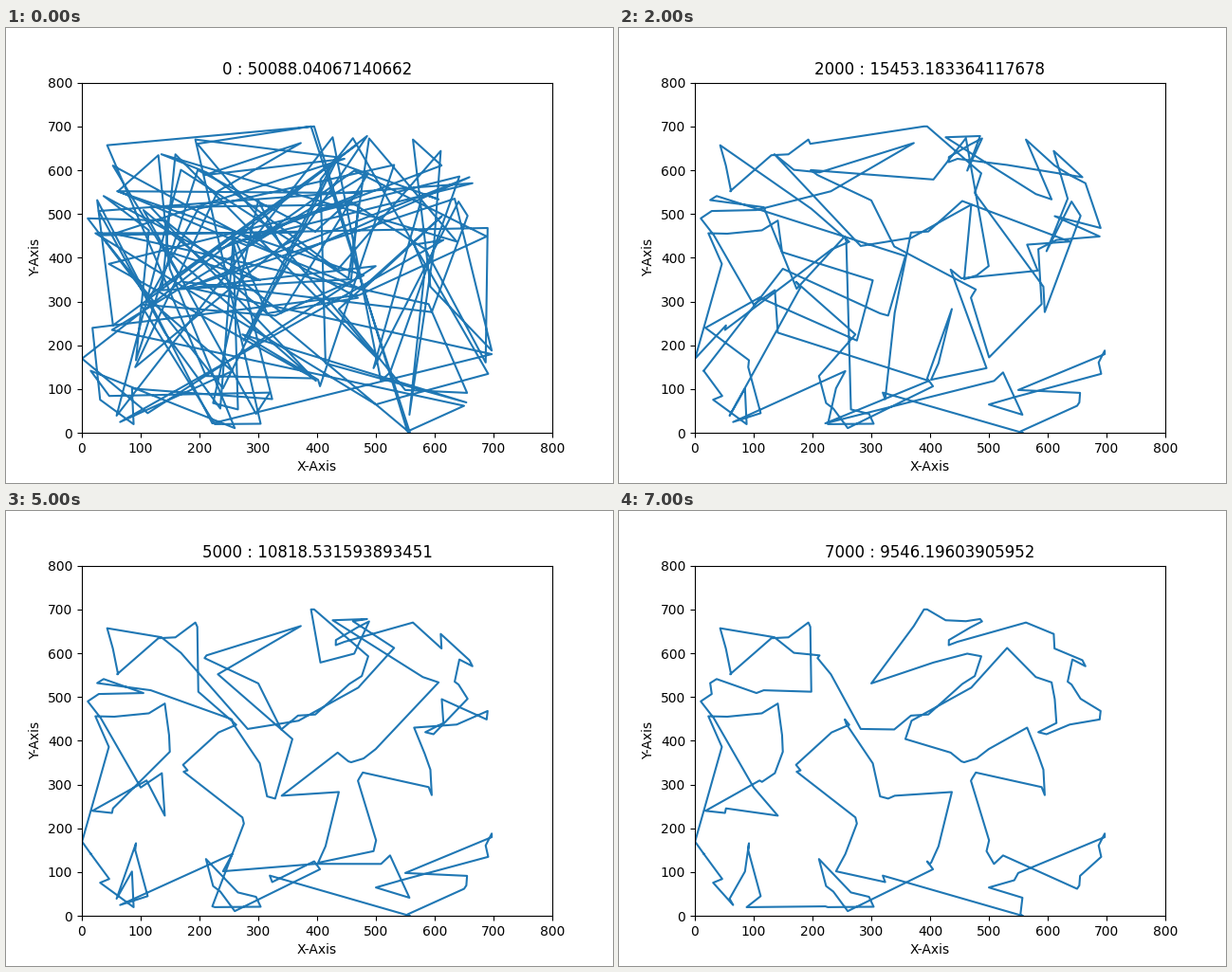
These frames come from a looping animation (640 px wide and 480 px high, 8000 ms). A matplotlib script:

```python
import random

import numpy as np
import matplotlib.pyplot as plt
from matplotlib.animation import FuncAnimation

LENGTHS = [50088.04067140662, 21998.50401487357, 15453.183364117678,
           12662.564032588038, 11598.27184635092, 10818.531593893451,
           10127.63820491755, 9546.19603905952]

# Main corners of the shortest tour, in visiting order
CORNERS = np.array([
    (15, 142), (65, 25), (92, 166), (88, 20), (304, 21), (211, 130),
    (260, 11), (398, 119), (437, 283), (315, 273), (255, 449), (172, 345),
    (273, 225), (240, 102), (558, 0), (500, 65), (697, 180), (691, 135),
    (650, 62), (496, 148), (472, 315), (595, 276), (565, 430), (458, 351),
    (358, 404), (531, 612), (612, 495), (598, 415), (690, 468), (634, 535),
    (659, 584), (563, 670), (432, 630), (485, 678), (395, 700), (300, 531),
    (487, 593), (397, 460), (282, 427), (212, 595), (43, 657), (60, 552),
    (193, 670), (198, 512), (37, 541), (10, 490), (141, 229), (18, 240),
    (136, 326), (141, 485), (23, 456),
], dtype=float)

rng = random.Random(11)


def add_stops(corners):
    """Put two more cities near every edge between two corners."""
    cities = []
    for a, b in zip(corners, np.roll(corners, -1, axis=0)):
        cities.append(a)
        for t in sorted((rng.random(), rng.random())):
            nudge = np.array([rng.gauss(0, 9), rng.gauss(0, 9)])
            cities.append(a + t * (b - a) + nudge)
    return np.clip(cities, 5 * (corners.min() > 0), 700)


def tour_length(tour):
    return dist[tour, np.roll(tour, -1)].sum()


def undo_swaps(tour, length):
    """Reverse stretches of the tour until it is as long as asked."""
    tour = tour.copy()
    n = len(tour)
    total = tour_length(tour)
    max_gain = length / 55
    while total < length:
        i, j = sorted(rng.sample(range(n), 2))
        a, b = tour[i - 1], tour[i]
        c, d = tour[j], tour[(j + 1) % n]
        gain = dist[a, c] + dist[b, d] - dist[a, b] - dist[c, d]
        if 0 < gain < max_gain:
            tour[i:j + 1] = tour[i:j + 1][::-1].copy()
            total += gain
    return tour


cities = add_stops(CORNERS)
dist = np.hypot(*(cities[:, None] - cities[None]).transpose(2, 0, 1))

# The search only shortens the tour, so build it backwards from the best one
tours = [np.arange(len(cities))]
for length in LENGTHS[-2::-1]:
    tours.insert(0, undo_swaps(tours[0], length))

fig, ax = plt.subplots(figsize=(6.4, 4.8), dpi=100)
ax.set(xlim=(0, 800), ylim=(0, 800), xlabel="X-Axis", ylabel="Y-Axis")
line, = ax.plot([], [])
title = ax.set_title("")


def update(k):
    tour = tours[k]
    line.set_data(*cities[np.append(tour, tour[0])].T)
    title.set_text(f"{k * 1000} : {LENGTHS[k]}")
    return line, title


anim = FuncAnimation(fig, update, frames=len(tours), interval=1000,
                     repeat=True, repeat_delay=0)
plt.show()
```
